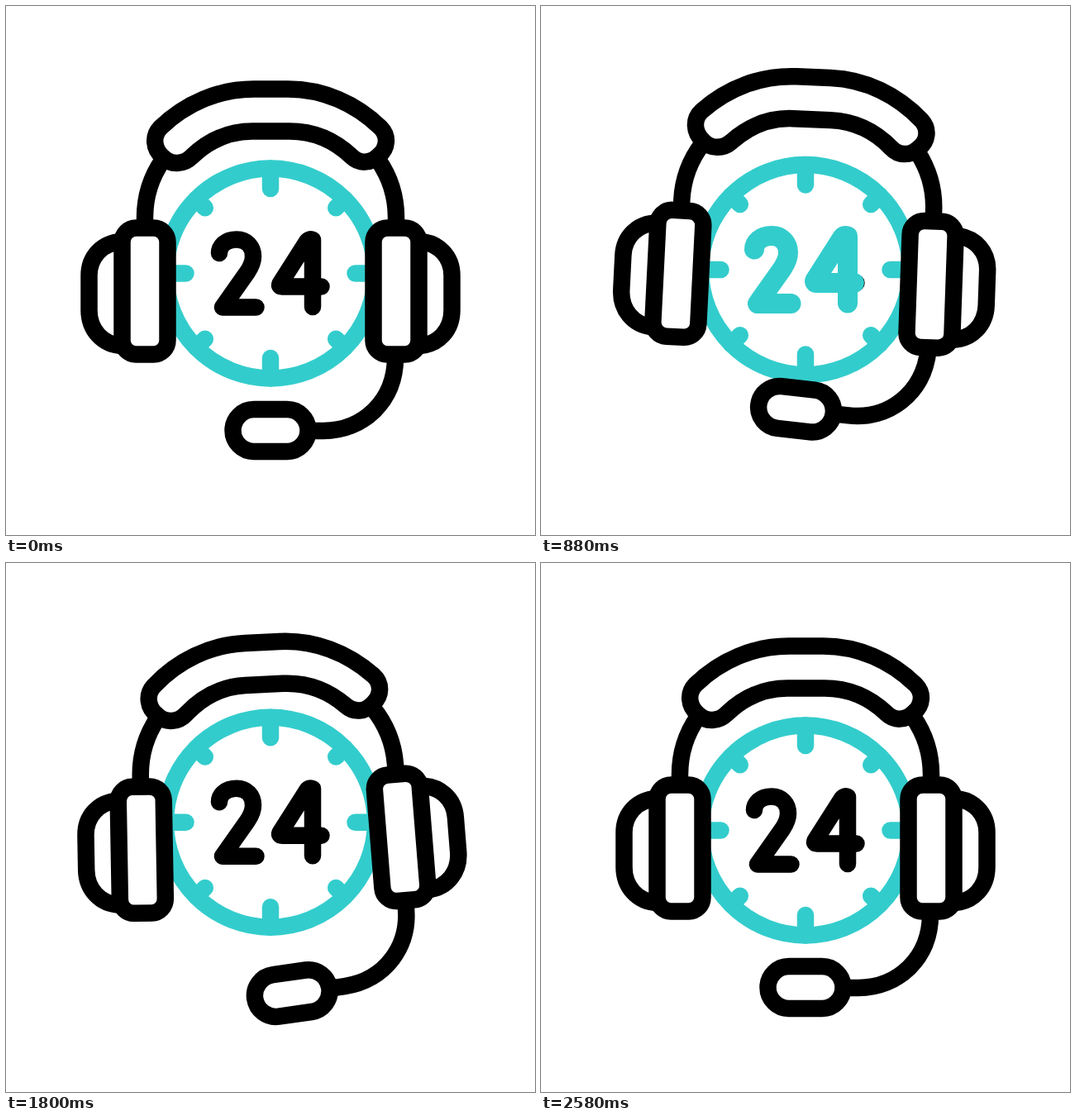
Recreate the animation shown at these times as an HTML page. Size 640 by 640 pixels, loop 2800 ms.

```html
<!DOCTYPE html>
<html lang="en">
<head>
<meta charset="utf-8">
<title>Round-the-clock support</title>
<style>
  html, body { margin: 0; width: 100%; height: 100%; overflow: hidden; background: #fff; }
  svg { display: block; width: 100%; height: 100%; }
  .line { fill: none; stroke: #000; stroke-width: 20.5; stroke-linecap: round; stroke-linejoin: round; }
  .solid { fill: #fff; }
  .teal { stroke: #33cccc; }
  .ink { stroke-width: 24; }
</style>
</head>
<body>
<svg viewBox="0 0 640 640">
  <defs>
    <path id="two" pathLength="1" d="M258 299C258 290 266 282.5 279 282.5C291 282.5 299 291 299 303C299 310 296 316 292 322L262 364.5H302.5"/>
    <path id="four" pathLength="1" d="M371 364V283Q367 281 364 285L331.5 336Q330 339.5 334 339.5H381.5"/>
    <g id="cup">
      <path d="M190 186C176 206 168 229 168 256V268"/>
      <path class="solid" d="M140.5 285C116 286 100.5 304 100.5 326V368C100.5 391 116 410 140.5 411"/>
      <rect class="solid" x="140.5" y="268.5" width="55" height="153" rx="17"/>
    </g>
  </defs>

  <g id="clock" class="line">
    <g id="dial" class="teal"><circle cx="320" cy="323.5" r="127"/></g>
    <use href="#two"/>
    <use href="#four"/>
    <g class="teal ink">
      <use id="inkTwo" href="#two"/>
      <use id="inkFour" href="#four"/>
    </g>
  </g>

  <g id="headset" class="line">
    <g id="left"><use href="#cup"/></g>
    <g id="right">
      <g id="mic">
        <path d="M471 425C471 478 432 514 384 514H370"/>
        <rect class="solid" x="274.5" y="488" width="91" height="51" rx="25.5"/>
      </g>
      <use href="#cup" transform="matrix(-1 0 0 1 640 0)"/>
    </g>
    <path class="solid" d="M300 100.5H341C384 100.5 423 118 453 147C463 157 462 172 451 181C441 191 427 191 418 182C397 162 372 151.5 343 151.5H298C269 151.5 246 162 225 182C215 192 200 193 190 183C178 173 177 157 187 147C217 118 257 100.5 300 100.5Z"/>
  </g>
</svg>
<script>
const LOOP = 2800;
const $ = id => document.getElementById(id);
const place = (id, transform) => $(id).setAttribute('transform', transform);

const ease = p => {
  p = Math.min(1, Math.max(0, p));
  return p * p * (3 - 2 * p);
};

// Eased swing from rest through evenly spaced peaks and back to rest
const wobble = (t, start, step, ...peaks) =>
  [...peaks, 0].reduce((value, peak, i, all) =>
    value + (peak - (all[i - 1] || 0)) * ease((t - start) / step - i), 0);

function trim(el, t, delay) {
  const start = ease((t - 1240 - delay) / 400);
  const end = ease((t - 428 - delay) / 400);
  const length = end - start;
  el.setAttribute('visibility', length > 0.0005 ? 'visible' : 'hidden');
  el.setAttribute('stroke-dasharray', `${length} 2`);
  el.setAttribute('stroke-dashoffset', -start);
}

for (let i = 0; i < 8; i++) {
  const tick = document.createElementNS('http://www.w3.org/2000/svg', 'path');
  tick.setAttribute('d', `M320 196.5V${i % 2 ? 211.5 : 221}`);
  place.call(null, 'dial', '');
  tick.setAttribute('transform', `rotate(${i * 45} 320 323.5)`);
  $('dial').append(tick);
}

function draw(now) {
  const t = now % LOOP;
  const clockY = wobble(t, 280, 375, 21, -18, 22, -10, 10);
  const headY = wobble(t, 215, 365, 25, -18, 20, -10, 9);
  const tilt = wobble(t, 425, 355, 4.5, -6, 6.5, -3.2, 3.4);
  const swing = wobble(t, 310, 370, 2.5, -2.7, 2.4, -1.8, 2.6);
  const mic = wobble(t, 425, 355, 7.5, -8, 7.5, -4, 4);

  place('clock', `translate(0 ${clockY})`);
  place('headset', `translate(0 ${headY}) rotate(${tilt} 320 320)`);
  place('left', `rotate(${-swing} 188 182)`);
  place('right', `rotate(${swing} 452 182)`);
  place('mic', `rotate(${mic} 471 428)`);
  trim($('inkTwo'), t, 0);
  trim($('inkFour'), t, 80);
  requestAnimationFrame(draw);
}
draw(performance.now());
</script>
</body>
</html>
```
